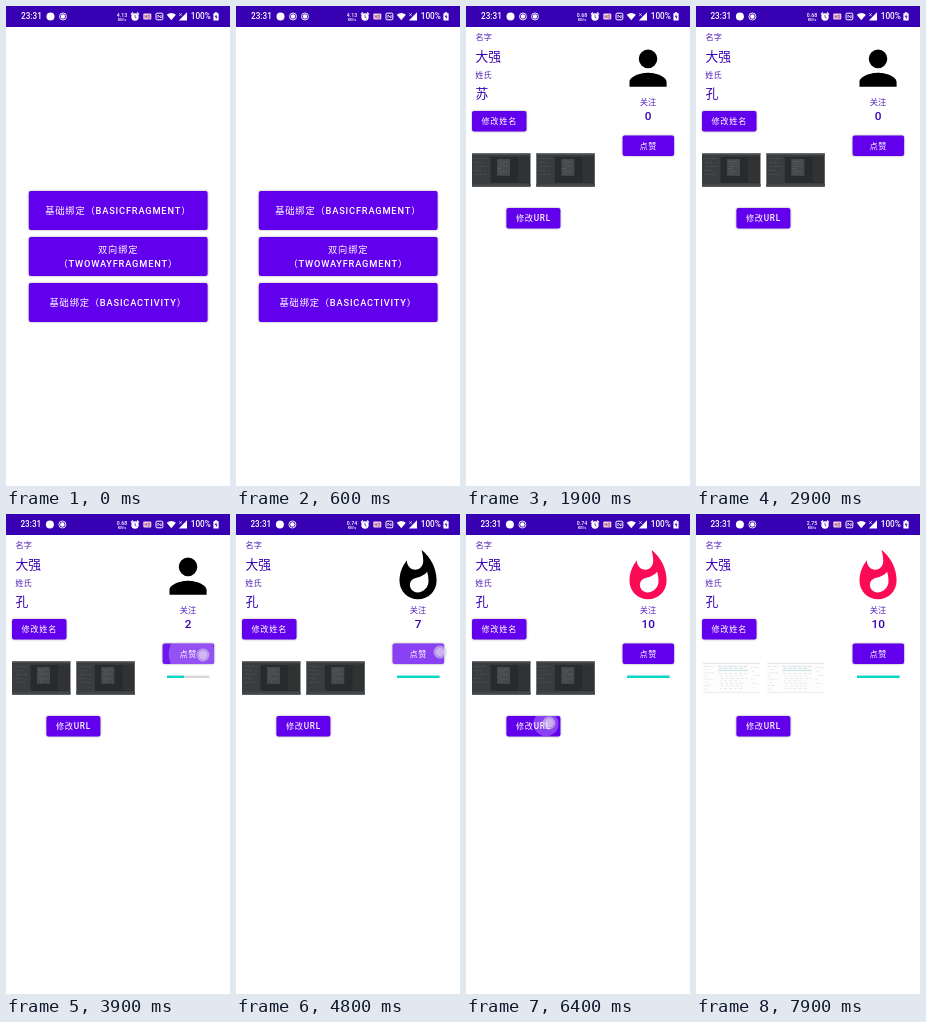
Recreate the animation shown at these times as an HTML page. Size 224x480 px, loop 8000 ms.

```html
<!DOCTYPE html>
<html lang="zh">
<head>
<meta charset="utf-8">
<style>
  html, body { margin: 0; width: 100%; height: 100%; overflow: hidden; background: #fff; }
  svg { display: block; width: 100%; height: 100%; font-family: Roboto, "Noto Sans CJK SC", "Noto Sans CJK", sans-serif; }
  .btn > rect { fill: #6200ee; filter: drop-shadow(0 .8px .8px rgba(0,0,0,.35)); }
  .btn text { fill: #fff; font-weight: 500; text-anchor: middle; }
  .ripple { fill: #fff; }
  .label, .value { fill: #3700b3; }
  .label { font-size: 8.2px; fill: #5524bd; }
  .value { font-size: 12.8px; }
  .mid { text-anchor: middle; }
  .status { fill: #fff; font-size: 8.2px; font-weight: 500; }
</style>
</head>
<body>
<svg viewBox="0 0 224 480">
  <g id="home"></g>
  <g id="page">
    <text class="label" x="9.6" y="34">名字</text>
    <text class="value" x="9.4" y="54.7">大强</text>
    <text class="label" x="9.2" y="72">姓氏</text>
    <text class="value" x="9.4" y="91.7" id="surname"></text>
    <g id="dark"></g>
    <g id="light"></g>
    <g transform="translate(154.2 34.3) scale(2.32)">
      <path id="person" d="M12 12a4 4 0 1 0 0-8a4 4 0 0 0 0 8zm0 2c-2.67 0-8 1.34-8 4v2h16v-2c0-2.66-5.33-4-8-4z"/>
      <path id="flame" d="M13.5.67s.74 2.65.74 4.8c0 2.06-1.35 3.73-3.41 3.73-2.07 0-3.63-1.67-3.63-3.73l.03-.36C5.21 7.51 4 10.62 4 14c0 4.42 3.58 8 8 8s8-3.58 8-8C20 8.61 17.41 3.8 13.5.67zM11.71 19c-1.78 0-3.22-1.4-3.22-3.14 0-1.62 1.05-2.76 2.81-3.12 1.77-.36 3.6-1.21 4.62-2.58.39 1.29.59 2.65.59 4.04 0 2.65-2.15 4.8-4.8 4.8z"/>
    </g>
    <text class="label mid" x="182" y="99">关注</text>
    <text class="value mid" x="182.2" y="114" style="font-size:11.8px;font-weight:500" id="count"></text>
    <g id="progress">
      <rect x="161" y="161.6" width="42.5" height="2.4" fill="#d8d8d8"/>
      <rect id="bar" x="161" y="161.6" height="2.4" fill="#03dac5"/>
    </g>
  </g>

  <rect width="224" height="21" fill="#3700b3"/>
  <g class="status">
    <g id="left">
      <text x="15" y="13.4">23:31</text>
      <circle cx="44.5" cy="10.5" r="4"/>
      <g id="rec">
        <circle cx="57" cy="10.5" r="3.5" fill="none" stroke="#fff" stroke-width=".9"/>
        <circle cx="57" cy="10.5" r="2.2"/>
      </g>
      <use href="#rec" x="12" id="rec2"/>
    </g>
    <text class="mid" x="116" y="10.8" font-size="5.2" id="speed"></text>
    <text class="mid" x="116" y="15.4" font-size="4">KB/s</text>
    <circle cx="129" cy="11" r="3.7"/>
    <path d="M125 8.5l2-2M133 8.5l-2-2" stroke="#fff" stroke-width="1.2"/>
    <path d="M129 8.8v2.4l1.5 1" stroke="#3700b3" stroke-width=".7" fill="none"/>
    <rect x="137.3" y="7.6" width="8" height="6" rx="1" fill="#f0d5e4"/>
    <path d="M139 9v3.2M139 10.6h1.6M140.6 9v3.2M142 9v3.2h1.6v-3.2z" stroke="#a03c78" stroke-width=".6" fill="none"/>
    <rect x="150" y="7.2" width="6.8" height="6.6" rx="1" fill="none" stroke="#fff"/>
    <path d="M152 12V9l3 3V9" stroke="#fff" stroke-width=".8" fill="none"/>
    <path d="M160.7 8.8q4.6-3.4 9.2 0l-4.6 5.4z"/>
    <path d="M181 6.3v8.2h-8.2z"/>
    <path d="M173.2 7.3l2.6 2.6m0-2.6l-2.6 2.6" stroke="#fff" stroke-width=".7"/>
    <text x="184.8" y="13.4">100%</text>
    <path d="M207.4 7.2h1.4v-.9h2.4v.9h1.4v7.4h-5.2z"/>
    <path d="M210.4 8.2l-1.7 2.9h1.2v2.2l1.6-2.9h-1.1z" fill="#3700b3"/>
  </g>
  <g id="dot">
    <circle r="6.4" fill="#dcd6ec" fill-opacity=".55" stroke="#a79fba" stroke-opacity=".4" stroke-width=".7"/>
    <circle r="4.2" fill="#fff" fill-opacity=".3"/>
  </g>
</svg>
<script>
const $ = id => document.getElementById(id);
const show = (id, on) => $(id).style.display = on ? '' : 'none';

// Buttons
const buttons = {};
function button(parent, id, x, y, w, h, lines, size) {
  const cx = x + w / 2, cy = y + h / 2, gap = 13.5;
  const text = lines.map((s, i) => {
    const base = cy + size * .37 + (i - (lines.length - 1) / 2) * gap;
    return `<text x="${cx}" y="${base}" font-size="${size}" letter-spacing="${size * .0893}">${s}</text>`;
  }).join('');
  const box = `<rect x="${x}" y="${y}" width="${w}" height="${h}" rx="2"/>`;
  $(parent).insertAdjacentHTML('beforeend',
    `<g class="btn"><clipPath id="${id}Clip">${box}</clipPath>${box}
     <g class="ripple" id="${id}" clip-path="url(#${id}Clip)"></g>${text}</g>`);
  buttons[id] = { cx, cy, reach: Math.hypot(w, h) / 2 };
}
button('home', 'basic', 22.8, 185, 178.8, 39, ['基础绑定（BASICFRAGMENT）'], 9.25);
button('home', 'twoWay', 22.8, 231, 178.8, 39, ['双向绑定', '（TWOWAYFRAGMENT）'], 9.25);
button('home', 'activity', 22.8, 277, 178.8, 39, ['基础绑定（BASICACTIVITY）'], 9.25);
button('page', 'rename', 6, 105, 54.5, 20.5, ['修改姓名'], 8.2);
button('page', 'url', 40.4, 202, 54, 20.5, ['修改URL'], 8.2);
button('page', 'like', 156.6, 129.6, 51.5, 20.5, ['点赞'], 8.2);

// Screenshot thumbnails
const rect = (x, y, w, h, fill) => `<rect x="${x}" y="${y}" width="${w}" height="${h}" fill="${fill}"/>`;
const rows = (n, x, y, step, w, color, dash) => Array.from({ length: n }, (_, i) =>
  `<path d="M${x + i % 3} ${y + i * step}h${w - i * 5 % 9}" stroke="${color}" stroke-width=".6" stroke-dasharray="${dash}"/>`).join('');
const darkShot = rect(0, 0, 58.5, 33.2, '#3a3d3f') + rect(0, 0, 58.5, 1.2, '#565a5c') +
  rect(18.5, 3.4, 39, 26, '#292a2b') + rect(25, 5.5, 13, 17, '#45494a') +
  rows(5, 2, 5, 4, 13, '#54595b', '3 1') + rows(6, 26, 8, 2.4, 10, '#656a6c', '2 1') +
  rect(46, 3.4, 11.5, 26, '#303233') + rect(0, 30.4, 58.5, 2.8, '#424648');
const lightShot = rect(0, 0, 58.5, 33.2, '#fdfdfd') + rect(1, 1.5, 57, .7, '#cfd8d8') +
  rows(8, 1.5, 5, 3.2, 10, '#d3d3d3', '2 1') + rows(2, 16, 5, 2, 30, '#bcc9cb', '4 1') +
  rect(16, 8.8, 30, .7, '#a9dcd8') + rows(7, 17, 12, 2.5, 28, '#d6dada', '3 2') +
  rows(6, 49, 6, 4, 8, '#d8d8d8', '2 1') + rect(1, 30.5, 57, .5, '#d2dcdc');
for (const x of [6, 70.3]) {
  $('dark').innerHTML += `<g transform="translate(${x} 147.4)">${darkShot}</g>`;
  $('light').innerHTML += `<g transform="translate(${x} 147.4)">${lightShot}</g>`;
}

// Taps
const tap = (id, down, hold, x, y) => ({ id, down, up: down + hold, x, y });
const likes = Array.from({ length: 10 }, (_, i) =>
  tap('like', 3504 + 168 * i, 130, Math.min(204, 197 + 1.4 * (i - 2)), 141 - .6 * (i - 2)));
const taps = [
  tap('basic', 904, 150, 187, 199.5),
  tap('rename', 2250, 130, 45, 115),
  ...likes,
  tap('url', 6390, 130, 83, 209)
];
const GROW = 160, FADE = 150;

function ripple(p, t) {
  if (t < p.down || t > p.up + FADE) return '';
  const b = buttons[p.id];
  const k = 1 - (1 - Math.min(1, (t - p.down) / GROW)) ** 3;
  const alpha = .25 * (1 - Math.max(0, t - p.up) / FADE);
  return `<circle cx="${p.x + (b.cx - p.x) * k}" cy="${p.y + (b.cy - p.y) * k}"
    r="${b.reach * (.3 + .7 * k)}" fill-opacity="${alpha}"/>`;
}

function draw(t) {
  const enter = Math.min(1, Math.max(0, (t - 1150) / 200));
  $('home').style.opacity = 1 - enter;
  $('page').style.opacity = enter;

  for (const id in buttons)
    $(id).innerHTML = taps.filter(p => p.id === id).map(p => ripple(p, t)).join('');
  const touch = taps.find(p => t >= p.down && t < p.up);
  show('dot', touch);
  if (touch) $('dot').setAttribute('transform', `translate(${touch.x} ${touch.y})`);

  const n = likes.filter(p => t >= p.up).length;
  $('count').textContent = n;
  show('progress', n);
  $('bar').setAttribute('width', 42.5 * Math.min(1, n / 5));
  show('person', n < 5);
  show('flame', n >= 5);
  $('flame').setAttribute('fill', n > 9 ? '#fc0b55' : '#000');

  $('surname').textContent = t < 2380 ? '苏' : '孔';
  show('dark', t < 6700);
  show('light', t >= 6700);

  $('speed').textContent = t < 1500 ? '4.13' : t < 4500 ? '0.68' : t < 7500 ? '0.74' : '2.75';
  show('rec2', t >= 500 && t < 2800);
  $('left').setAttribute('transform', `translate(${t < 2800 ? 0 : -.6})`);
}

const start = performance.now();
(function loop() {
  draw((performance.now() - start) % 8000);
  requestAnimationFrame(loop);
})();
</script>
</body>
</html>
```
